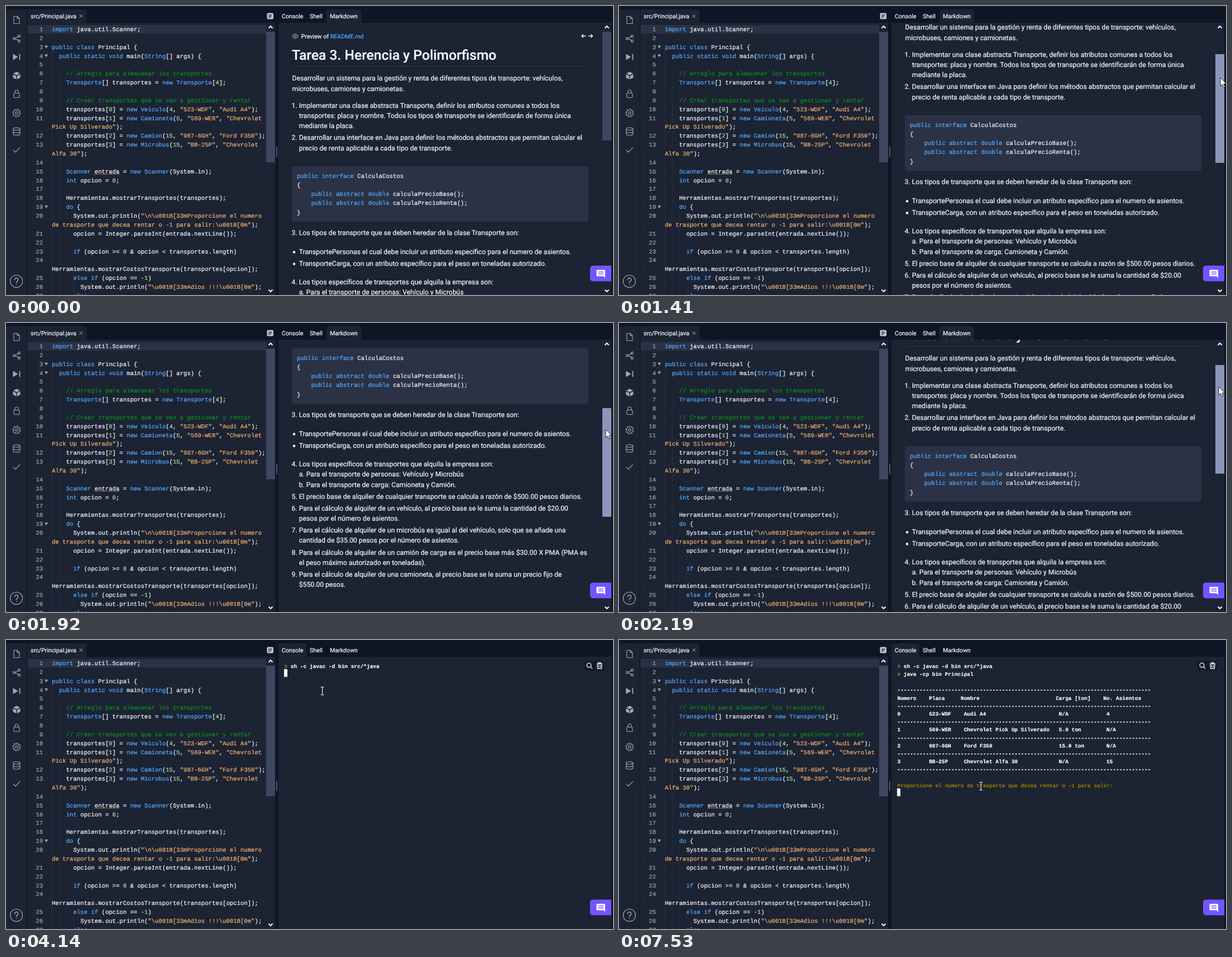
An HTML page that plays this animation: 1085 px wide and 516 px high, repeating every 8 s.

```html
<!DOCTYPE html>
<html lang="es">
<head>
<meta charset="utf-8">
<title>Tarea 3</title>
<style>
html, body { margin: 0; width: 100%; height: 100%; overflow: hidden; background: #0e1525; }
svg { display: block; width: 1085px; height: 516px; }
text {
  --ink: #f5f9fc; fill: var(--ink); stroke: var(--ink); stroke-width: .22;
  font: 10.6px Roboto, sans-serif; white-space: pre; text-rendering: geometricPrecision;
}
.code { font: 10.6px "Liberation Mono", monospace; }
.term { font: bold 9.45px "Liberation Mono", monospace; }
.prose { font-size: 12.2px; }
.title { font-size: 24.6px; font-weight: 500; }
text.num { --ink: #a4a9b3; }
text.key { --ink: #57abff; }
text.str { --ink: #f2b36f; }
text.lit { --ink: #b5dca0; }
text.rem { --ink: #0b9118; }
text.gold { --ink: #8f7500; }
.icon { fill: none; stroke: #a3a9b2; stroke-width: 1.1; stroke-linejoin: round; stroke-linecap: round; }
.solid { fill: #a3a9b2; }
.white { fill: none; stroke: #f5f9fc; stroke-width: 1.3; }
</style>
</head>
<body>
<svg id="stage" viewBox="0 0 1085 516"></svg>
<script>
const PANEL = '#1c2333', RAISED = '#2b3245', THUMB = '#3f4660', THUMB_HOT = '#8e95ba';
const CHAR = 6.36, ROW = 15.86, TERM_ROW = 14.2;

const escape = s => s.replace(/&/g, '&amp;').replace(/</g, '&lt;');
const text = (x, y, s, cls = '', attrs = '') => `<text x="${x}" y="${y}" class="${cls}" ${attrs}>${escape(s)}</text>`;
const rect = (x, y, w, h, fill, r = 0, attrs = '') =>
  `<rect x="${x}" y="${y}" width="${w}" height="${h}" rx="${r}" fill="${fill}" ${attrs}/>`;
const path = (d, cls = 'icon', attrs = '') => `<path d="${d}" class="${cls}" ${attrs}/>`;
const group = (id, body, attrs = '') => `<g id="${id}" ${attrs}>${body}</g>`;

// Source code: "~" marks a soft wrap.
const source = String.raw`import java.util.Scanner;

public class Principal {
  public static void main(String[] args) {

    // Arreglo para almacenar los transportes
    Transporte[] transportes = new Transporte[4];

    // Crear transportes que se van a gestionar y rentar
    transportes[0] = new Veiculo(4, "523-WDF", "Audi A4");
    transportes[1] = new Camioneta(5, "569-WER", "Chevrolet~Pick Up Silverado");
    transportes[2] = new Camion(15, "987-6GH", "Ford F350");
    transportes[3] = new Microbus(15, "BB-25P", "Chevrolet~Alfa 30");

    Scanner entrada = new Scanner(System.in);
    int opcion = 0;

    Herramientas.mostrarTransportes(transportes);
    do {
      System.out.println("\n\u001B[33mProporcione el numero~de trasporte que decea rentar o -1 para salir:\u001B[0m");
      opcion = Integer.parseInt(entrada.nextLine());

      if (opcion >= 0 & opcion < transportes.length)
        ~Herramientas.mostrarCostosTransporte(transportes[opcion]);
      else if (opcion == -1)
        System.out.println("\u001B[33mAdios !!!\u001B[0m");
      else`.split('\n');

const TOKENS = new RegExp([
  '(?<rem>//.*)', '(?<str>"[^"]*")', 'java\\.\\S+',
  '(?<key>\\b(?:import|public|class|static|void|abstract|interface|double|new|int|do|if|else|String|Scanner|Transporte|Veiculo|Camioneta|Camion|Microbus)\\b)',
  '(?<lit>-?\\b\\d+\\b)', '[\\w.]+', '\\s+', '[^\\w\\s"]'
].join('|'), 'g');

function codeLine(line, left, baseline) {
  let col = 0, y = baseline, out = '';
  for (const match of line.matchAll(TOKENS)) {
    const kind = Object.keys(match.groups).find(k => match.groups[k]) || '';
    match[0].split('~').forEach((part, i) => {
      if (i) { col = 0; y += ROW; }
      if (part.trim()) out += text(left + col * CHAR, y, part, 'code ' + kind);
      col += part.length;
    });
  }
  return out;
}

function editor() {
  let out = rect(38, 30, 443, 486, PANEL) + rect(39, 34, 426, 15, RAISED), row = 0, depth = 0;
  source.forEach((line, i) => {
    const y = 45 + row * ROW;
    out += text(66, y, String(i + 1), 'code num', 'text-anchor="end"');
    if ([3, 4, 19].includes(i + 1)) out += path(`M69 ${y - 6}h6l-3 5z`, 'solid');
    if (line.trim()) depth = line.search(/\S/);
    for (let col = 0; col < depth; col += 2)
      out += path(`M${82.5 + col * CHAR} ${y - 11.5}v${ROW}`, '', 'stroke="#3c445c" stroke-dasharray="1 2"');
    out += codeLine(line, 82, y);
    row += line.split('~').length;
  });
  out += path('M158 300.5H202', '', 'stroke="#c98a35" stroke-dasharray="2 1"');
  return out + rect(465, 30, 16, 486, PANEL) + rect(465, 46, 16, 233, THUMB) + scrollArrows(473);
}

const scrollArrows = x => path(`M${x - 3.5} 39.5l3.5-3.5 3.5 3.5M${x - 3.5} 506.5l3.5 3.5 3.5-3.5`, 'white', 'style="stroke-width:2"');

function toolbar() {
  return rect(0, 6, 37, 510, PANEL) +
    path('M14 18.5h6l4 4v9H14zM20 18.5v4h4') +
    path('M16 58l7-4M16 58l7 4') +
    [[14.5, 58], [23.5, 53.5], [23.5, 62.5]].map(([x, y]) => `<circle cx="${x}" cy="${y}" r="2" class="icon"/>`).join('') +
    path('M13 86.5l7.5 4.5-7.5 4.5z', 'icon', 'style="fill:#a3a9b2"') + path('M24.5 86.5v9', 'icon', 'style="stroke-width:1.8"') +
    path('M19 117.5l6 3-6 3-6-3zM12.5 122l5.8 3v6l-5.8-3zM25.5 122l-5.8 3v6l5.8-3z', 'solid') +
    rect(14, 155.5, 10, 8, 'none', 1.5, 'class="icon"') + path('M16 155v-2a3 3 0 0 1 6 0v2') +
    gear(19, 191) +
    path('M13 219.5a6 2.3 0 0 1 12 0a6 2.3 0 0 1-12 0v9a6 2.3 0 0 0 12 0v-9M13 224a6 2.3 0 0 0 12 0') +
    path('M13.5 257.5l3.5 3.5 7.5-8') +
    '<circle cx="18.5" cy="491.5" r="11" class="icon"/>' +
    path('M15.5 488.8a3.1 3.1 0 1 1 4.8 2.5q-1.7 1.1-1.7 2.6M18.6 497v.2', 'icon', 'style="stroke-width:1.5"');
}

function gear(cx, cy) {
  const points = Array.from({ length: 32 }, (_, i) => {
    const angle = (i + .5) * Math.PI / 16, radius = i % 4 < 2 ? 7 : 5.3;
    return `${cx + radius * Math.cos(angle)} ${cy + radius * Math.sin(angle)}`;
  });
  return path(`M${points.join('L')}Z`) + `<circle cx="${cx}" cy="${cy}" r="2.2" class="icon"/>`;
}

// Each entry: [vertical centre, marker, text]; lettered items are indented.
const prose = [
  [129, '', 'Desarrollar un sistema para la gestión y renta de diferentes tipos de transporte: vehículos,'],
  [148, '', 'microbuses, camiones y camionetas.'],
  [178, '1.', 'Implementar una clase abstracta Transporte, definir los atributos comunes a todos los'],
  [196, ' ', 'transportes: placa y nombre. Todos los tipos de transporte se identificarán de forma única'],
  [214, ' ', 'mediante la placa.'],
  [235, '2.', 'Desarrollar una interface en Java para definir los métodos abstractos que permitan calcular el'],
  [253.5, ' ', 'precio de renta aplicable a cada tipo de transporte.'],
  [405, '3.', 'Los tipos de transporte que se deben heredar de la clase Transporte son:'],
  [439, '•', 'TransportePersonas el cual debe incluir un atributo específico para el numero de asientos.'],
  [460, '•', 'TransporteCarga, con un atributo específico para el peso en toneladas autorizado.'],
  [493, '4.', 'Los tipos específicos de transportes que alquila la empresa son:'],
  [511, 'a.', 'Para el transporte de personas: Vehículo y Microbús'],
  [530, 'b.', 'Para el transporte de carga: Camioneta y Camión.'],
  [550.5, '5.', 'El precio base de alquiler de cualquier transporte se calcula a razón de $500.00 pesos diarios.'],
  [571.5, '6.', 'Para el cálculo de alquiler de un vehículo, al precio base se le suma la cantidad de $20.00'],
  [590, ' ', 'pesos por el número de asientos.'],
  [611, '7.', 'Para el cálculo de alquiler de un microbús es igual al del vehículo, solo que se añade una'],
  [629, ' ', 'cantidad de $35.00 pesos por el número de asientos.'],
  [650.5, '8.', 'Para el cálculo de alquiler de un camión de carga es el precio base más $30.00 X PMA (PMA es'],
  [669, ' ', 'el peso máximo autorizado en toneladas).'],
  [689.5, '9.', 'Para el cálculo de alquiler de una camioneta, al precio base se le suma un precio fijo de'],
  [707.5, ' ', '$550.00 pesos.']
];

const sample = ['public interface CalculaCostos', '{', '    public abstract double calculaPrecioBase();',
  '    public abstract double calculaPrecioRenta();', '}'];

function markdown() {
  let out = path('M511.5 54q5.5-8 11 0q-5.5 8-11 0z') + '<circle cx="517" cy="54" r="1.8" class="icon"/>' +
    text(527.5, 57.7, 'Preview of ') + text(579.5, 57.7, 'README.md', 'key') +
    path('M1036.5 53.5h-7.5m3-3l-3 3 3 3M1041 53.5h7.5m-3-3l3 3-3 3', 'white') +
    text(511, 95.5, 'Tarea 3. Herencia y Polimorfismo', 'title') +
    rect(511, 107, 530, 1, RAISED) + rect(511, 286, 530, 99, RAISED, 4);
  sample.forEach((line, i) => out += codeLine(line, 520, 307.3 + i * 16.05));
  for (const [centre, marker, line] of prose) {
    const y = centre + 4.2, nested = /[ab]\./.test(marker) ? 13 : 0;
    if (marker === '•') out += `<circle cx="515" cy="${centre + .5}" r="2.2" fill="#f5f9fc"/>`;
    else if (marker.trim()) out += text(520.5 + nested, y, marker, 'prose', 'text-anchor="end"');
    out += text((marker ? 523.7 : 511.5) + nested, y, line, 'prose');
  }
  return out;
}

const RULE = '-'.repeat(80);
const columns = (offset, ...cells) => cells.reduce((s, c, i) => s.padEnd([0, 10, 20, 50, 65][i] + (i > 1 ? offset : 0)) + c, '');
const output = [
  '> sh -c javac -d bin src/*java', '> java -cp bin Principal', '', RULE,
  columns(0, 'Numero', 'Placa', 'Nombre', 'Carga [ton]', 'No. Asientos'), RULE,
  columns(1, '0', '523-WDF', 'Audi A4', 'N/A', '4'), RULE,
  columns(1, '1', '569-WER', 'Chevrolet Pick Up Silverado', '5.0 ton', 'N/A'), RULE,
  columns(1, '2', '987-6GH', 'Ford F350', '15.0 ton', 'N/A'), RULE,
  columns(1, '3', 'BB-25P', 'Chevrolet Alfa 30', 'N/A', '15'), RULE, '',
  'Proporcione el numero de trasporte que decea rentar o -1 para salir:'
];

function terminal() {
  const lines = output.map((line, i) => {
    const y = 49.8 + i * TERM_ROW;
    const body = line[0] === '>'
      ? path(`M498.5 ${y - 5.5}l3.5 2.7-3.5 2.7`, '', 'fill="none" stroke="#b58410" stroke-width="1.4"') + text(508.8, y, line.slice(2), 'term')
      : text(497.5, y, line, i === 15 ? 'term gold' : 'term');
    return `<g class="out">${body}</g>`;
  }).join('');
  return lines + rect(497, 38, 6, 13.8, '#f5f9fc', 0, 'id="caret"') +
    group('tools', rect(1034, 37, 35, 18, '#131a2a', 3) +
      '<circle cx="1042" cy="45" r="3.8" class="white"/>' + path('M1045 48l3 3', 'white') +
      path('M1056 42.5h10M1059 42v-1.5h4V42M1057 43.5l.6 7.5h6.8l.6-7.5M1059.5 44.5v4.5M1062.5 44.5v4.5', 'white'));
}

function chatButton() {
  return path('M1082 463.5h-33a5 5 0 0 0-5 5v18a5 5 0 0 0 5 5h33z', '', 'fill="#7355ff"') +
    path('M1057 471h12.5a1.5 1.5 0 0 1 1.5 1.5v13l-3-3h-11a1.5 1.5 0 0 1-1.5-1.5v-8.5a1.5 1.5 0 0 1 1.5-1.5z', '', 'fill="#fff"') +
    path('M1058.5 475h9.5M1058.5 478.5h9.5', '', 'stroke="#7355ff" stroke-width="1.3"');
}

document.getElementById('stage').innerHTML =
  '<clipPath id="view"><rect x="487" y="30" width="579" height="486"/></clipPath>' +
  rect(0, 0, 1085, 516, '#0e1525') + toolbar() +
  rect(38, 6, 106, 30, PANEL, 4) + text(44, 21.7, 'src/Principal.java') + path('M131.5 15.5l5 5m0-5l-5 5', 'icon', 'style="stroke-width:1"') +
  rect(466.5, 12.5, 11.5, 11, '#c2c8cc', 2) + path('M469 16h6.5M469 18.2h6.5M469 20.4h4', '', 'stroke="#0e1525"') +
  editor() + rect(483, 251, 2, 19, '#50566f', 1) +
  rect(573, 6, 62, 30, PANEL, 4, 'id="tab"') + rect(487, 30, 595, 486, PANEL) +
  text(493, 21.7, 'Console') + text(543, 21.7, 'Shell') + text(579, 21.7, 'Markdown') +
  group('readme', `<g clip-path="url(#view)">${group('page', markdown())}</g>` + rect(1066, 46, 16, 194, THUMB, 0, 'id="thumb"') + scrollArrows(1074)) +
  group('console', terminal()) + chatButton() +
  group('arrow', path('M0 0V14.8L3.5 11.6 6 17 8.2 16 5.9 10.8H10.5Z', '', 'fill="#fff" stroke="#000" stroke-width=".8"')) +
  group('beam', path('M-3-7h2l1 1 1-1h2M0-6V6M-3 7h2l1-1 1 1h2', 'white', 'style="stroke-width:1.1"'));

// Linear interpolation through [time, ...values] keys.
function along(keys, t) {
  const next = keys.findIndex(k => k[0] > t);
  if (next < 0) return keys[keys.length - 1].slice(1);
  if (!next) return keys[0].slice(1);
  const a = keys[next - 1], b = keys[next], f = (t - a[0]) / (b[0] - a[0]);
  return a.slice(1).map((v, i) => v + (b[i + 1] - v) * f);
}

const dragKeys = [[1140, 0], [1260, 15], [1410, 40], [1620, 84], [1770, 99], [1920, 106], [1950, 106],
  [2040, 84], [2220, 18], [2310, 0]];
const arrowKeys = [[0, 1090, 168], [150, 980, 94], [270, 905, 56], [570, 905, 56], [780, 1010, 72], [990, 1075, 88],
  [1410, 1075, 88], [1620, 1072, 86], [1920, 1072, 84], [2430, 1072, 86], [2640, 800, 44], [2850, 536, 3]];
const beamKeys = [[4050, 563, 62], [4080, 565, 104], [4110, 565.5, 98], [4140, 565.5, 91],
  [7350, 565.5, 91], [7440, 606, 170], [7530, 647, 261]];
const caretKeys = [[3840, 0], [3990, 1], [6600, 2], [6960, 6], [7170, 9], [7200, 12], [7230, 16]];

const $ = id => document.getElementById(id);
const show = (node, visible) => node.setAttribute('visibility', visible ? 'visible' : 'hidden');
const move = (id, x, y) => $(id).setAttribute('transform', `translate(${x} ${y})`);
const lines = [...document.querySelectorAll('.out')];

function draw(time) {
  const t = Math.floor(time % 8000 / 30) * 30, running = t >= 3660;
  const [drag] = along(dragKeys, t), [x, y] = along(arrowKeys, t);
  $('tab').setAttribute('x', running ? 487 : 573);
  $('tab').setAttribute('width', running ? 50 : 62);
  show($('readme'), !running);
  move('page', 0, -Math.round(drag * 2.274));
  $('thumb').setAttribute('y', 46 + Math.round(drag));
  $('thumb').setAttribute('fill', t >= 960 && t < 2460 ? THUMB_HOT : THUMB);
  show($('arrow'), t >= 30 && t < 2850);
  move('arrow', x, y + drag);

  const step = caretKeys.filter(k => k[0] <= t).pop();
  const row = step ? step[1] : -1;
  lines.forEach((line, i) => show(line, i < row));
  show($('caret'), row >= 0);
  $('caret').setAttribute('y', 37.8 + row * TERM_ROW);
  show($('tools'), t >= 4050);
  show($('beam'), t >= 4050);
  move('beam', ...along(beamKeys, t));
}

function tick() {
  draw(performance.now());
  requestAnimationFrame(tick);
}
tick();
</script>
</body>
</html>
```
